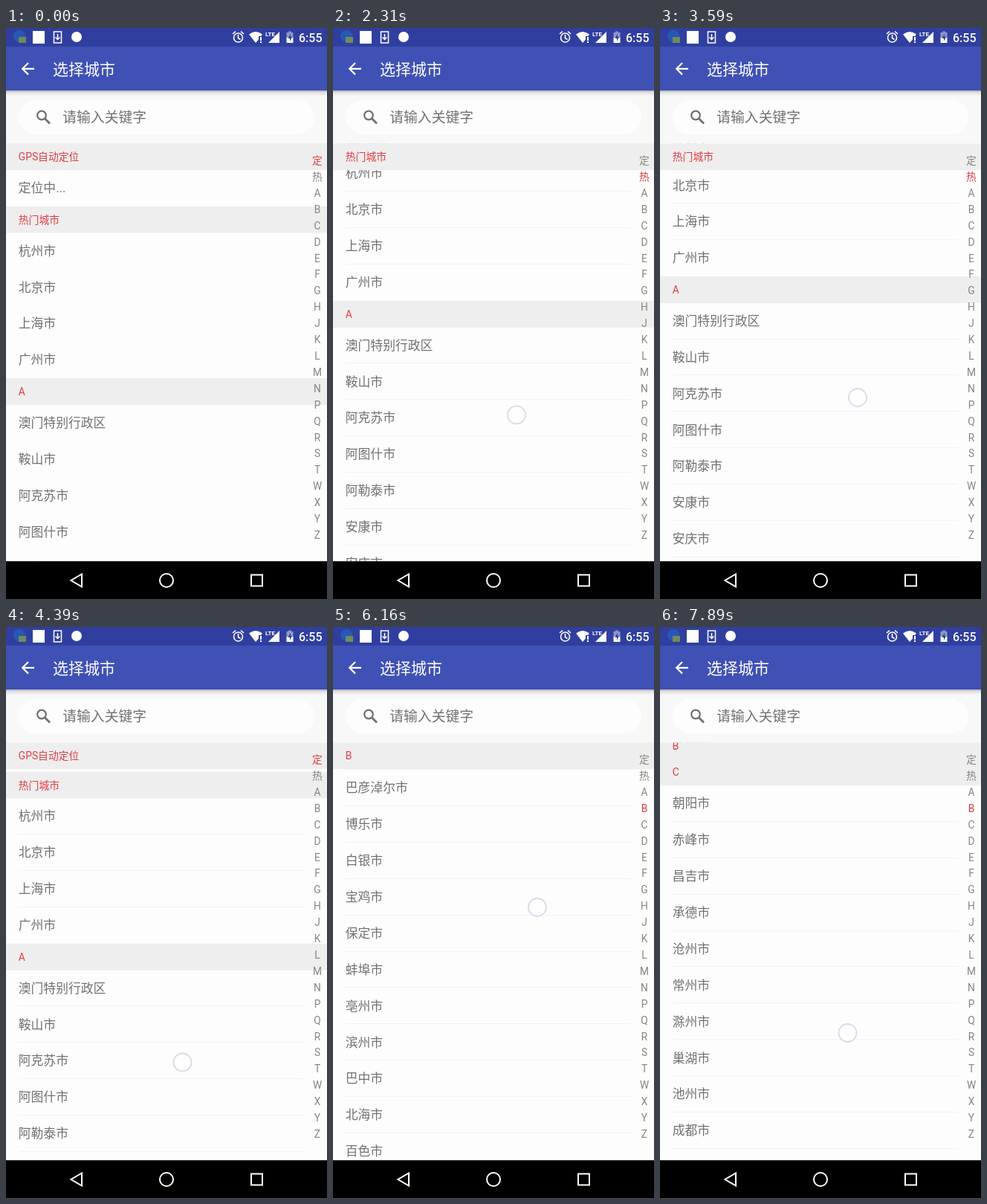
Animation, 432 px wide and 768 px high, one loop 7990 ms. Source, as an HTML page with a canvas:

```html
<!DOCTYPE html>
<html lang="zh-CN">
<head>
<meta charset="utf-8">
<title>选择城市</title>
<style>
html, body { margin: 0; width: 100%; height: 100%; overflow: hidden; background: #000; }
canvas { display: block; width: 432px; height: 768px; }
</style>
</head>
<body>
<canvas id="stage" width="432" height="768"></canvas>
<script>
(() => {
const ctx = document.getElementById('stage').getContext('2d');
const W = 432, LOOP = 7990;
const LIST_TOP = 155.3, LIST_END = 717.5, HEAD = 35.6, ROW = 48.9;
const INK = '#707070', RED = '#e23c42', BAND = '#eeeeee', WHITE = '#fff';
const INDEX = [...'定热ABCDEFGHJKLMNPQRSTWXYZ'];

const sections = [
  ['GPS自动定位', '定位中...'],
  ['热门城市', '杭州市 北京市 上海市 广州市'],
  ['A', '澳门特别行政区 鞍山市 阿克苏市 阿图什市 阿勒泰市 安康市 安庆市 安阳市 安顺市'],
  ['B', '北京市 本溪市 白城市 白山市 包头市 巴彦淖尔市 博乐市 白银市 宝鸡市 保定市 蚌埠市 亳州市 滨州市 巴中市 北海市 百色市 毕节市 保山市'],
  ['C', '朝阳市 赤峰市 昌吉市 承德市 沧州市 常州市 滁州市 巢湖市 池州市 成都市 常德市 郴州市 潮州市 崇左市 楚雄市']
].map(([name, rows]) => ({ name, rows: rows.split(' ') }));

let offset = 0;
for (const s of sections) {
  s.top = offset;
  offset += HEAD + s.rows.length * ROW;
}

// [time, scroll offset]
const scrollKeys = [
  [0, 0], [670, 0], [1500, 62], [2310, 104.1], [3590, 137], [4390, 45.2], [5460, 238.5],
  [5650, 300], [6050, 860], [6300, 1250], [6700, 1755], [6870, 1767.4], [7890, 1685.1], [7990, 1685.1]
];
// [time, x, y] for each finger contact
const touches = [
  [[670, 236, 628], [1500, 241, 565], [2310, 247, 520.5], [3590, 266, 497], [4390, 237.5, 585.5], [5460, 275.5, 389], [5650, 278, 330]],
  [[6000, 250, 590], [6250, 285, 290]],
  [[6780, 281, 440], [6870, 280.5, 441], [7890, 252.5, 546], [7990, 252.5, 546]]
];

// Monotone cubic interpolation of column c
function track(keys, t, c = 1) {
  const n = keys.length - 1;
  if (t <= keys[0][0]) return keys[0][c];
  if (t >= keys[n][0]) return keys[n][c];
  let i = 0;
  while (keys[i + 1][0] < t) i++;
  const slope = k => (keys[k + 1][c] - keys[k][c]) / (keys[k + 1][0] - keys[k][0]);
  const tangent = k => {
    if (k === 0 || k === n) return 0;
    const a = slope(k - 1), b = slope(k);
    return a * b > 0 ? 2 * a * b / (a + b) : 0;
  };
  const a = keys[i], b = keys[i + 1], h = b[0] - a[0], u = (t - a[0]) / h, v = 1 - u;
  return a[c] * v * v * (1 + 2 * u) + b[c] * u * u * (3 - 2 * u)
    + h * u * v * (v * tangent(i) - u * tangent(i + 1));
}

function rect(x, y, w, h, color) {
  ctx.fillStyle = color;
  ctx.fillRect(x, y, w, h);
}

function text(str, x, cy, size, color, align = 'left', weight = 400) {
  ctx.font = `${weight} ${size}px Roboto, "Noto Sans CJK SC", "Noto Sans CJK", sans-serif`;
  ctx.textAlign = align;
  ctx.fillStyle = color;
  ctx.fillText(str, x, cy + size * 0.37);
}

function disc(x, y, r, color) {
  ctx.beginPath();
  ctx.arc(x, y, r, 0, Math.PI * 2);
  ctx.fillStyle = color;
  ctx.fill();
}

function ring(x, y, r, color, width) {
  ctx.beginPath();
  ctx.arc(x, y, r, 0, Math.PI * 2);
  ctx.strokeStyle = color;
  ctx.lineWidth = width;
  ctx.stroke();
}

function line(d, color, width) {
  ctx.strokeStyle = color;
  ctx.lineWidth = width;
  ctx.stroke(new Path2D(d));
}

function shape(d, color) {
  ctx.fillStyle = color;
  ctx.fill(new Path2D(d));
}

function header(name, y) {
  rect(0, y, W, HEAD + 0.3, BAND);
  text(name, 16.8, y + 17.8, 13.8, RED);
}

function list(scroll, divided) {
  ctx.save();
  ctx.beginPath();
  ctx.rect(0, LIST_TOP, W, LIST_END - LIST_TOP);
  ctx.clip();
  rect(0, LIST_TOP, W, LIST_END - LIST_TOP, '#fdfdfd');

  let current = 0;
  sections.forEach((s, i) => {
    if (s.top <= scroll) current = i;
    const y = LIST_TOP + s.top - scroll;
    s.rows.forEach((city, r) => {
      const ry = y + HEAD + r * ROW;
      if (ry > LIST_END || ry + ROW < LIST_TOP) return;
      text(city, 16.8, ry + 24, 16.8, INK);
      if (divided && r < s.rows.length - 1) rect(17, Math.round(ry + ROW - 1), 384, 1, '#f2f2f8');
    });
    if (y < LIST_END && y + HEAD > LIST_TOP) header(s.name, y);
  });

  // The next header pushes the pinned one away
  const next = sections[current + 1];
  const push = next ? Math.min(0, next.top - scroll - HEAD) : 0;
  header(sections[current].name, LIST_TOP + push);
  ctx.restore();

  INDEX.forEach((ch, i) =>
    text(ch, 419, 178 + i * 21.91, 13.8, i === current ? RED : '#858585', 'center'));
}

function statusBar() {
  rect(0, 0, W, 25, '#303f9f');
  disc(18, 11, 8, '#2858b4');
  rect(17, 12, 10, 8, '#6f8a5c');
  rect(36, 4, 16, 17, WHITE);
  line('M64.5 5H74.5V20H64.5Z', WHITE, 1.5);
  line('M69.5 8V15M66.5 12.5L69.5 15.5L72.5 12.5', WHITE, 1.5);
  disc(95, 12, 7, WHITE);

  ring(312.5, 13, 6, WHITE, 1.6);
  line('M312.5 9V13.5L315.5 15.5M305 8L309 4.6M320 8L316 4.6', WHITE, 1.6);
  shape('M327 8.5Q336 1.5 345 8.5L343 11H340V15.5L336 20Z', WHITE);
  rect(342, 12, 2, 5, WHITE);
  rect(342, 18, 2, 2, WHITE);
  shape('M368 5V20H353Z', WHITE);
  text('LTE', 349, 8, 8, WHITE, 'left', 700);
  rect(380, 4.5, 4, 2, '#8c95c8');
  rect(377.5, 6, 9, 7, '#8c95c8');
  rect(377.5, 13, 9, 7, WHITE);
  shape('M383 8L379.5 14H382V18L385 12H383Z', '#303f9f');
  text('6:55', 394, 13, 16, WHITE, 'left', 500);
}

function topBars() {
  rect(0, 84, W, LIST_TOP - 84, '#f8f8f8');
  ctx.beginPath();
  ctx.roundRect(17, 97, 398, 46, 23);
  ctx.fillStyle = '#fdfdfd';
  ctx.fill();
  ring(48, 117.5, 5.8, INK, 2.2);
  line('M52.5 122L59 128.5', INK, 2.8);
  text('请输入关键字', 76.3, 120, 18.8, INK);

  const shade = ctx.createLinearGradient(0, 84, 0, 92);
  shade.addColorStop(0, 'rgba(80,80,80,.45)');
  shade.addColorStop(0.35, 'rgba(120,120,120,.18)');
  shade.addColorStop(1, 'rgba(150,150,150,0)');
  rect(0, 84, W, 8, shade);

  rect(0, 25, W, 59, '#3f51b5');
  line('M38 54.8H22.5M30 47L22.2 54.8L30 62.6', WHITE, 2.2);
  text('选择城市', 63, 55, 21, WHITE);
  statusBar();
}

function navBar() {
  rect(0, LIST_END, W, 768 - LIST_END, '#000');
  line('M102 734.5V751.5L87.5 743Z', WHITE, 2);
  ring(216, 743, 9, WHITE, 2);
  line('M330 735.5H345V750.5H330Z', WHITE, 2);
}

function pointer(t) {
  const keys = touches.find(k => t >= k[0][0] && t <= k[k.length - 1][0]);
  if (!keys) return;
  const x = track(keys, t, 1), y = track(keys, t, 2);
  disc(x, y, 12, 'rgba(255,255,255,.6)');
  ring(x, y, 12, '#d9d9e8', 1.8);
}

function draw(t) {
  list(track(scrollKeys, t), t >= 170);
  topBars();
  navBar();
  pointer(t);
}

const start = performance.now();
function tick() {
  draw((performance.now() - start) % LOOP);
  requestAnimationFrame(tick);
}
tick();
})();
</script>
</body>
</html>
```
